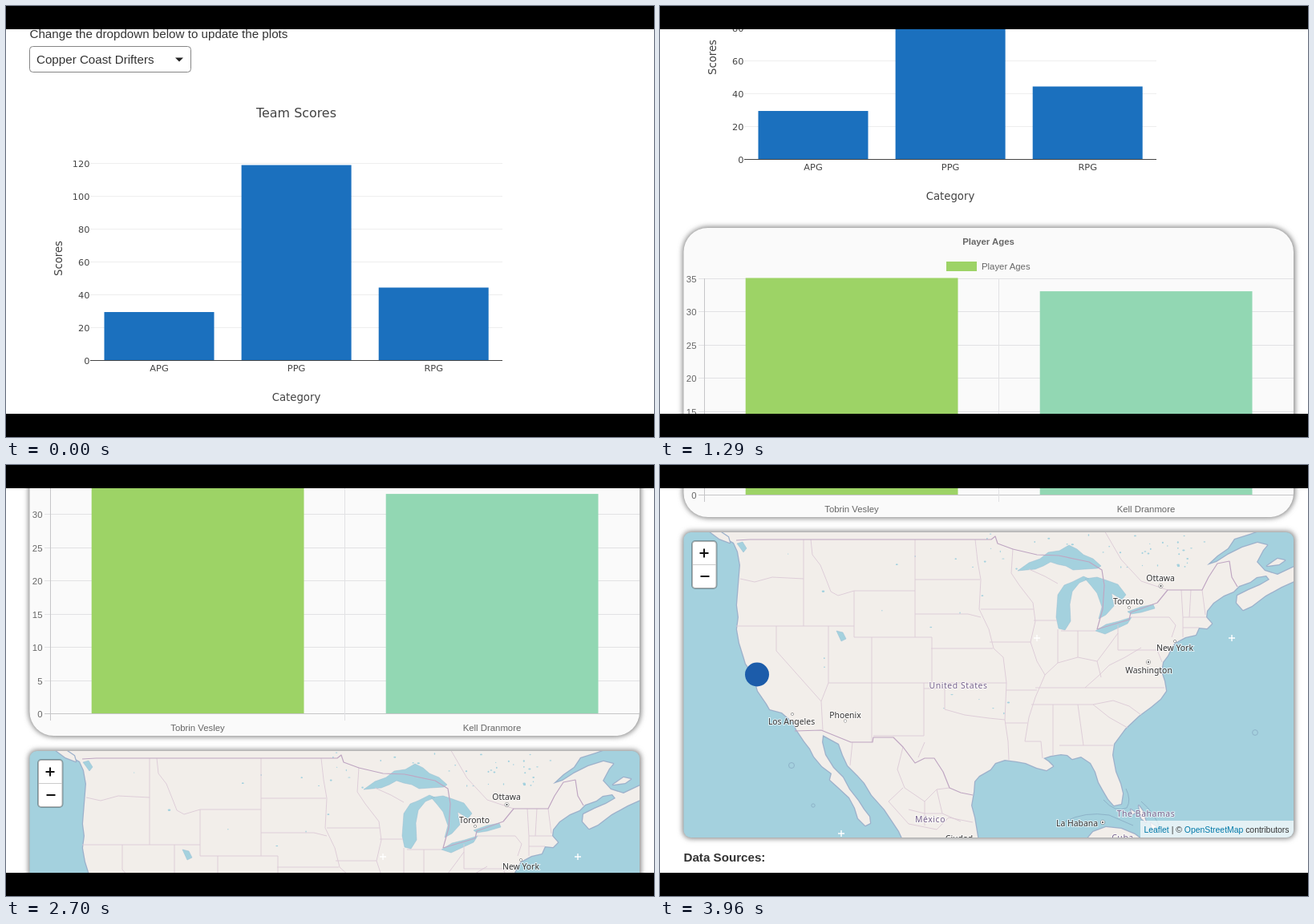
An HTML page that plays this animation: 808 by 538 pixels, repeating every 5.22 s.

```html
<!DOCTYPE html>
<html lang="en">
<head>
<meta charset="utf-8">
<title>Team dashboard</title>
<style>
  html, body { margin: 0; width: 100%; height: 100%; overflow: hidden; background: #fff; }
  svg { display: block; width: 100vw; height: 100vh; }
  .ui { font: 15.16px "Liberation Sans", Arial, sans-serif; fill: #333; }
  .plot { font: 11.37px "DejaVu Sans", Verdana, sans-serif; fill: #444; }
  .ages { font: 11.37px "Liberation Sans", Arial, sans-serif; fill: #666; }
  .place { font: 10.4px "Noto Sans", sans-serif; fill: #333; text-anchor: middle;
           stroke: #fff; stroke-opacity: .65; stroke-width: 2; paint-order: stroke; }
  .country { fill: #76628c; letter-spacing: .6px; }
  .credit { font: 10.42px "Liberation Sans", Arial, sans-serif; fill: #333; }
  .credit .link { fill: #0078a8; }
  .lake { fill: #a4d1de; stroke: #97bdd0; stroke-width: .5; }
  .state { fill: none; stroke: #dccad6; stroke-width: .9; }
  .border { fill: none; stroke: #bfa6c2; stroke-width: 1.2; stroke-linejoin: round; }
  .coast { fill: #f2eeea; stroke: #9db1cb; stroke-width: 2.6; stroke-linejoin: round; paint-order: stroke; }
</style>
</head>
<body>
<svg viewBox="0 0 808 538" preserveAspectRatio="none">
  <defs>
    <filter id="soft" x="-5%" y="-10%" width="110%" height="120%"><feGaussianBlur stdDeviation="3.4"/></filter>
    <clipPath id="mapFrame"><rect x="29.5" y="84" width="760.5" height="381" rx="9"/></clipPath>
  </defs>
  <rect width="808" height="538" fill="#fff"/>
  <g id="page">
    <g class="ui">
      <text x="29.5" y="39.5">Change the dropdown below to update the plots</text>
      <rect x="29.5" y="50.5" width="201" height="32" rx="4" fill="#fff" stroke="#858585"/>
      <text x="38" y="72">Copper Coast Drifters</text>
      <path d="M211 64.5h10l-5 5z" fill="#222"/>
      <text x="29.5" y="1339" font-weight="bold">Data Sources:</text>
    </g>

    <g id="scores" class="plot">
      <text x="362" y="138.5" text-anchor="middle" font-size="15.9">Team Scores</text>
      <text x="362" y="493" text-anchor="middle" font-size="13.27">Category</text>
      <text transform="translate(69.5 315) rotate(-90)" text-anchor="middle" font-size="13.27">Scores</text>
    </g>

    <rect x="28" y="526.5" width="764" height="384" rx="32" fill="#858585" filter="url(#soft)"/>
    <rect x="29.5" y="528" width="760.5" height="381" rx="30" fill="#fafafa"/>
    <g id="ages" class="ages">
      <text x="409.5" y="548.5" text-anchor="middle" font-weight="bold">Player Ages</text>
      <rect x="357" y="570" width="38" height="12" fill="#9dd366"/>
      <text x="401" y="580">Player Ages</text>
    </g>

    <g transform="translate(0 844)">
      <rect x="28" y="82.5" width="764" height="384" rx="11" fill="#858585" filter="url(#soft)"/>
      <g clip-path="url(#mapFrame)">
        <rect x="29" y="83" width="762" height="383" fill="#a4d1de"/>
        <g class="coast">
          <path d="M66 80L76 88 92 97 97 108 100 125 98 150 96 175 98 190 96 205 99 222 104 238 107 248 114 258 118 268 122 282 133 298 137 305 152 309 160 316 166 321 170 330
            180 345 187 354 192 364 202 376 214 385 212 393 222 402 236 415 243 428 247 441 256 450 262 447 261 439 254 430 247 419 236 405 228 390 216 378 206 362 202 346 203 337
            212 342 223 348 228 362 234 375 246 387 255 397 264 412 280 430 290 445 298 457 304 470
            H397L392 440 388 425 391 408 392 395 398 388 412 380 418 372 430 368 445 370 456 372 470 378 482 381 490 376 484 370 478 366 487 363 500 361 508 362 514 367 525 364 537 372
            543 383 547 396 552 405 559 417 566 425 575 423 577 410 574 398 568 383 564 362 566 348 580 329 597 313 612 302 624 292 631 282 629 270 625 258 627 246 633 238 638 228 642 222
            655 215 668 212 672 203 682 204 688 198 681 190 682 182 690 172 703 163 715 158 722 151 736 146 744 140 756 138 760 143 748 150 734 156 720 163 719 172 727 181 738 176 755 163 775 152 795 143
            L795 125 770 137 754 132 744 121 752 106 757 100 745 97 726 103 708 112 694 121 682 125 695 113 708 104 716 92 735 86 752 80Z"/>
          <path d="M58 80L74 92 87 97 85 90 70 80Z"/>
          <path d="M530 470L540 458 556 452 575 454 592 461 604 470Z"/>
          <path d="M757 126L772 124 779 119 770 117Z"/>
          <path d="M597 425L602 432 606 446 600 441ZM587 430L593 434 589 436ZM612 447L619 452 614 455Z"/>
        </g>
        <path class="lake" d="M446 132L460 122 474 117 484 109 498 107 510 100 520 105 528 112 540 117 550 126 546 129 530 130 515 131 506 126 496 124 487 121 478 126 468 130Z
          M496 162L504 150 514 146 528 139 535 142 523 147 514 158 511 174 512 195 505 206 497 204 494 190Z
          M530 142L545 140 557 144 571 149 581 162 576 168 563 160 566 176 556 187 547 192 551 177 545 160 537 150Z
          M543 207L556 199 572 195 588 190 583 198 570 204 555 211Z
          M583 183L600 177 615 174 617 179 600 184 587 186Z
          M220 207L228 209 232 217 226 220ZM96 98L103 96 108 104 104 109Z"/>
        <g id="ponds" fill="#a4d1de"></g>
        <path class="state" d="M100 142L118 146 140 140 179 142M179 93V201M95 201H242M188 93L190 112 200 125 208 145 213 158 222 163 242 157M145 201V232L201 295 203 331M210 201V272L201 295
          M242 157H318M242 157V215H339M264 215V346M210 272H432M318 93V215M318 143H399M318 186H384L400 190M339 215V272M338 229H415M329 272V338H266M329 279H355V305L380 312 410 316 430 318
          M393 93L396 120 400 143 398 180 410 205 416 229 428 240 432 272 430 318 434 345 435 368M400 180H466M411 221H462M440 104L438 135 448 150 465 172 468 195 462 221 470 245 480 262 468 290 460 315 455 345H475L477 366
          M466 194H495M460 130L480 139 496 148M496 205V247M521 207V240M500 207H543M480 262L496 247 521 240 545 245 560 225 571 210V200M571 210V231H628M468 278H629M463 299H540M432 281H470M430 322H458
          M490 299V363M521 299L528 350M498 350H565M540 299L560 315 583 328M540 299L565 294 585 301 600 312M530 278L548 262 560 250 580 240 600 228M545 245L550 265M587 190H635L643 200 638 215
          M650 156L652 190V215M662 156L660 190M652 190H681M676 156L680 187M652 203H672M620 231L626 246M553 80L575 118 600 145 633 156M330 346L322 365M303 352L296 380 305 403 330 420 345 405 361 403
          M240 346L237 375M303 403L285 420 310 448 345 455M345 405L352 435 375 445M310 430L330 435 352 435M345 455L360 440 390 446M330 420V450"/>
        <path class="border" d="M95 94L112 93H413L418 89 421 98 440 105 470 112 497 113 535 121 551 131 554 150 552 180 545 205 585 193 587 184 620 172 633 156H676L684 140 695 123 710 120 713 140 720 152
          M168 332L201 331 238 346H265L266 340H291L303 352 318 372 330 366 342 366 353 383 361 403 375 409 390 412"/>
        <g fill="none" stroke="#8db2c8">
          <circle cx="742" cy="334" r="3.4"/><circle cx="164" cy="375" r="3.5"/><circle cx="191" cy="425" r="2.2"/>
          <path d="M553 418Q568 435 582 428 588 418 581 404M600 420Q617 434 624 455M505 445Q530 432 560 437L590 450"/>
        </g>
        <path d="M709 216h8m-4-4v8M466 216h8m-4-4v8M222 460h8m-4-4v8" stroke="#fff" stroke-width="1.4"/>
        <g id="places" class="place"></g>
        <circle cx="121" cy="261.5" r="15" fill="#1c5caa"/>
        <rect x="599" y="444" width="191" height="21" fill="#fff" fill-opacity=".7"/>
        <text class="credit" x="603.5" y="458.5"><tspan class="link">Leaflet</tspan> | © <tspan class="link">OpenStreetMap</tspan> contributors</text>
        <rect x="40" y="95" width="30.5" height="59" rx="4" fill="#fff" stroke="#000" stroke-opacity=".3" stroke-width="2"/>
        <path d="M41 124.5h29" stroke="#ccc"/>
        <path d="M49.5 110h11m-5.5-5.5v11M50.5 139h11" stroke="#111" stroke-width="2"/>
      </g>
    </g>
  </g>
  <path d="M0 0H808V29H0ZM0 509H808V538H0Z"/>
</svg>
<script>
const byId = id => document.getElementById(id);

function add(parent, tag, attrs, text) {
  const node = document.createElementNS("http://www.w3.org/2000/svg", tag);
  for (const name in attrs) node.setAttribute(name, attrs[name]);
  if (text !== undefined) node.textContent = text;
  parent.append(node);
}
const line = (parent, d, stroke) => add(parent, "path", { d, stroke });
const label = (parent, x, y, anchor, text) => add(parent, "text", { x, y, "text-anchor": anchor }, text);

function bar(parent, x, width, base, height, fill) {
  add(parent, "rect", { x, y: base - height, width, height, fill });
}

function buildScores() {
  const chart = byId("scores"), base = 442.5, unit = 2.05;
  for (let v = 0; v <= 120; v += 20) {
    const y = base - v * unit;
    if (v) line(chart, `M105 ${Math.floor(y) + .5}H619`, "#eee");
    label(chart, 104.5, y + 4.2, "end", v);
  }
  [["APG", 29.5], ["PPG", 119], ["RPG", 44.4]].forEach(([name, value], i) => {
    const x = 122.5 + i * 171.1;
    bar(chart, x, 137, base, value * unit, "#1b70be");
    label(chart, x + 68.5, 456, "middle", name);
  });
  line(chart, `M105 ${base}H619`, "#444");
}

function buildAges() {
  const chart = byId("ages"), base = 882, unit = 8.3;
  for (let v = 0; v <= 35; v += 5) {
    const y = base - v * unit;
    line(chart, `M48 ${Math.round(y) - .5}H790`, v ? "#e2e2e4" : "#c6c6c8");
    label(chart, 45.5, y + 4, "end", v);
  }
  line(chart, "M55.5 591V890", "#c6c6c8");
  line(chart, "M422.5 591V890", "#e2e2e4");
  [["Tobrin Vesley", 35, "#9dd366"], ["Kell Dranmore", 33, "#92d7b3"]].forEach(([name, value, fill], i) => {
    const x = 106.7 + i * 367;
    bar(chart, x, 264.8, base - 1, value * unit, fill);
    label(chart, x + 132.3, 903, "middle", name);
  });
}

function buildMapDetails() {
  const places = byId("places");
  const city = (name, x, y, dotX, dotY, capital) => {
    add(places, "circle", { cx: dotX, cy: dotY, r: capital ? 2.4 : 1.5, style: "fill:#fff;stroke:#555;stroke-width:.9;stroke-opacity:1" });
    if (capital) add(places, "circle", { cx: dotX, cy: dotY, r: 1, style: "stroke:none" });
    add(places, "text", { x, y }, name);
  };
  const country = (name, x, y) => add(places, "text", { x, y, class: "country" }, name);
  city("Ottawa", 624, 145, 624.5, 151, true);
  city("Toronto", 584, 174, 585, 178);
  city("New York", 642, 232, 642, 220);
  city("Washington", 609.5, 260, 609, 246, true);
  city("Los Angeles", 164, 323.5, 165, 311);
  city("Phoenix", 231, 315.5, 231, 319.5);
  city("La Habana", 520, 450.5, 552, 446, true);
  country("United States", 372, 278.5);
  country("México", 337, 445.5);
  country("The Bahamas", 606, 438.5);
  country("Cuba", 577, 469);
  add(places, "text", { x: 373, y: 470 }, "Ciudad");

  let seed = 7;
  const random = () => (seed = seed * 16807 % 2147483647) / 2147483647;
  for (let i = 0; i < 60; i++) {
    const north = i < 40;
    add(byId("ponds"), "ellipse", {
      cx: (north ? 390 : 130) + random() * (north ? 290 : 370),
      cy: 86 + random() * (north ? 45 : 230),
      rx: .6 + random() * 1.2, ry: .5 + random() * .8
    });
  }
}

// Each scroll eases in with power `rise` and settles with power `settle`.
const scrolls = [
  { start: 630, end: 1830, from: 0, to: 343, rise: 2, settle: 3.65 },
  { start: 1980, end: 2700, from: 343, to: 571, rise: 2, settle: 2.58 },
  { start: 3030, end: 3960, from: 571, to: 844, rise: 1.5, settle: 4.7 }
];
const clamp = v => Math.min(1, Math.max(0, v));

function scrollAt(time) {
  let y = 0;
  for (const { start, end, from, to, rise, settle } of scrolls) {
    const u = clamp((time - start) / (end - start));
    y += (to - from) * (1 - (1 - u ** rise) ** settle);
  }
  return Math.round(y);
}

const LOOP = 5220, STEP = 30;

function draw(now) {
  const time = Math.floor(now % LOOP / STEP) * STEP;
  byId("page").setAttribute("transform", `translate(0 ${-scrollAt(time)})`);
  requestAnimationFrame(() => draw(performance.now() - origin));
}

buildScores();
buildAges();
buildMapDetails();
const origin = performance.now();
draw(0);
</script>
</body>
</html>
```
